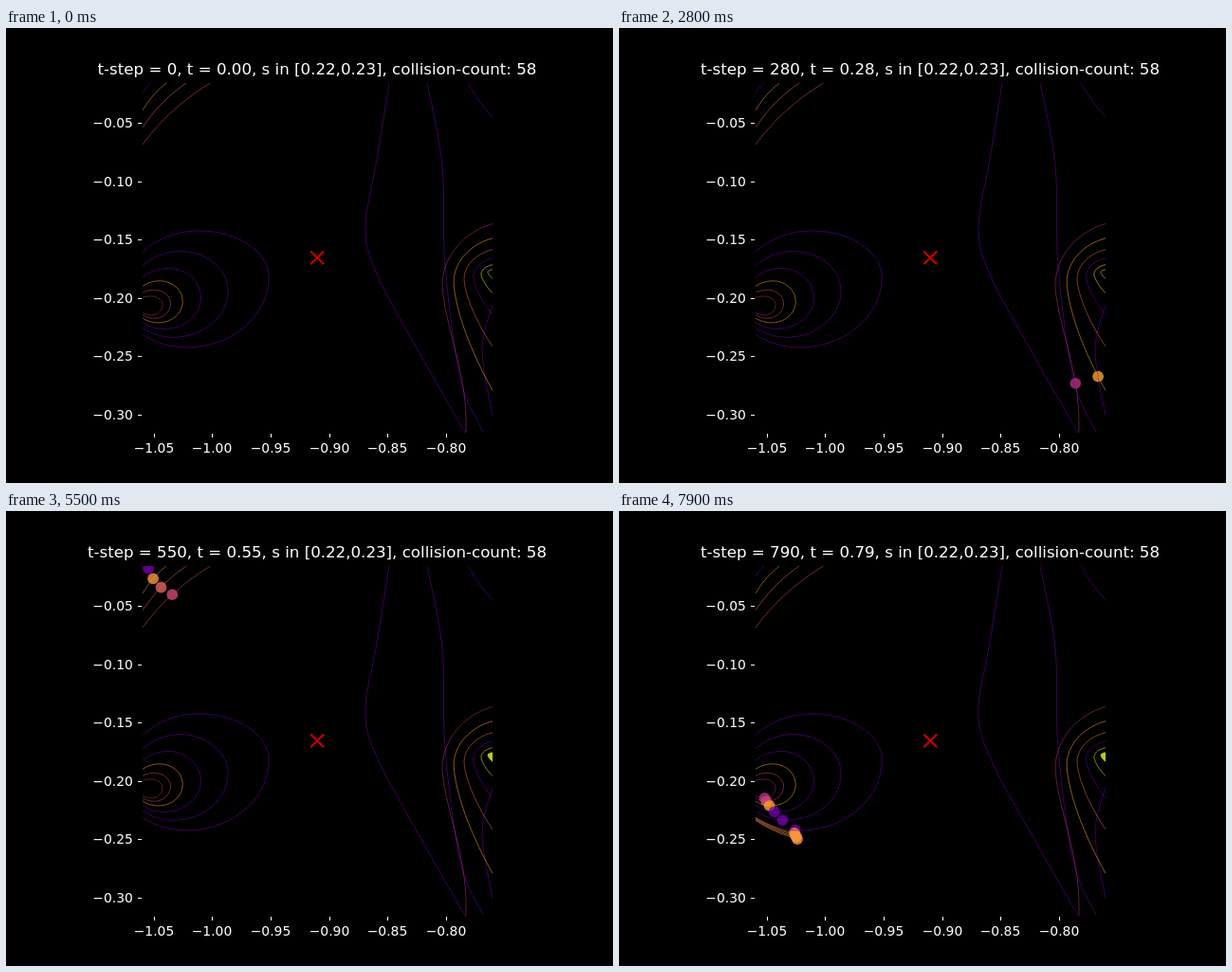
Animation, 640 px wide and 480 px high, one loop 8000 ms. Source, as an HTML page with a canvas:

```html
<!DOCTYPE html>
<html lang="en">
<head>
<meta charset="utf-8">
<title>Trajectories</title>
<style>
html, body { margin: 0; width: 100%; height: 100%; overflow: hidden; background: #000; }
canvas { display: block; width: 640px; height: 480px; }
</style>
</head>
<body>
<canvas id="stage" width="640" height="480"></canvas>
<script>
const ctx = document.getElementById('stage').getContext('2d');
const FONT = '"DejaVu Sans", sans-serif';
const PURPLE = '#7203a8', MAGENTA = '#b0307c', PINK = '#cc4778', SALMON = '#e16462',
      ORANGE = '#faa32c', AMBER = '#f89540', YELLOW = '#f0f921';
const LEFT = 144, TOP = 58, EDGE = 513, SIZE = 369;

// Points of f(u) for u from 0 to 1.
const sample = (f, n = 30) => Array.from({ length: n + 1 }, (_, i) => f(i / n));

// Quarter ellipse from p to q, leaving p vertically or horizontally.
function quarter(p, q, vertical) {
  return sample(u => {
    const s = Math.sin(u * Math.PI / 2), c = 1 - Math.cos(u * Math.PI / 2);
    return [p[0] + (q[0] - p[0]) * (vertical ? c : s), p[1] + (q[1] - p[1]) * (vertical ? s : c)];
  });
}

const bezier = (a, b, c) => sample(u =>
  [0, 1].map(k => (1 - u) ** 2 * a[k] + 2 * u * (1 - u) * b[k] + u * u * c[k]));

// Smooth curve through a few points.
function spline(p) {
  return p.slice(1).flatMap((c, i) => {
    const b = p[i], a = p[i - 1] || b, d = p[i + 2] || c;
    return sample(u => [0, 1].map(k => b[k] + 0.5 * u * (c[k] - a[k]
      + u * (2 * a[k] - 5 * b[k] + 4 * c[k] - d[k] + u * (3 * (b[k] - c[k]) + d[k] - a[k])))), 12);
  });
}

// Path of two parts; mark is the length where they join.
function path(color, before, after = []) {
  const pts = [...before, ...after].filter((p, i, all) =>
    !i || Math.hypot(p[0] - all[i - 1][0], p[1] - all[i - 1][1]) > 1e-6);
  const len = [0];
  for (let i = 1; i < pts.length; i++)
    len.push(len[i - 1] + Math.hypot(pts[i][0] - pts[i - 1][0], pts[i][1] - pts[i - 1][1]));
  const join = before[before.length - 1];
  const at = pts.findIndex(p => p[0] === join[0] && p[1] === join[1]);
  return { color, pts, len, mark: len[at < 0 ? len.length - 1 : at] };
}

// Point at length s, continued straight past both ends.
function pointAt({ pts, len }, s) {
  let i = 1;
  while (i < pts.length - 1 && len[i] < s) i++;
  const u = (s - len[i - 1]) / (len[i] - len[i - 1]);
  return [0, 1].map(k => pts[i - 1][k] + u * (pts[i][k] - pts[i - 1][k]));
}

const still = [
  [[404, 58], [391, 139], [379, 212], [393, 264], [440, 350], [484, 427]],
  [[444, 58], [460, 145], [463, 250], [479, 370], [503, 426]],
  [[487, 58], [499, 77], [513, 94]],
  [[513, 292], [502, 340], [513, 409]]
].map(p => path(PURPLE, spline(p)));

// Right edge: rising from below, turning at depth d, leaving to the upper right.
const right = [MAGENTA, ORANGE, SALMON, PURPLE, YELLOW, YELLOW].map((color, i) => {
  const d = 53 - 12.8 * i + 0.64 * i * i;
  const turn = [EDGE - d, 256 + 0.3 * d];
  const exit = 258 - 0.6 * d - 0.007 * d * d;
  const fall = i ? 1.2 * d + 0.039 * d * d : 155;
  const rise = sample(u => {
    const t = 1 - u;
    const x = i ? d * t ** 1.55 : 25 * Math.sin(1.68 * t) ** 1.5;
    return [turn[0] + x, turn[1] + fall * t];
  });
  const peak = [turn[0] + 1.45 * d, turn[1] - (turn[1] - exit) / 0.95];
  return path(color, rise, quarter(turn, peak, true));
});

// Upper left: from the top edge down to the left edge.
const upper = [PURPLE, AMBER, SALMON, PINK].map((color, j) => {
  const w = 9 + 14 * j + 2.3 * j * j, h = 11 + 18 * j;
  return path(color, bezier([LEFT + w, TOP], [LEFT + 0.4 * w, TOP + 0.4 * h], [LEFT, TOP + h]));
});

// Lower left: nested loops, each half as wide again, joined at the lowest point.
const lower = [MAGENTA, PINK, ORANGE, PURPLE, PURPLE, PURPLE].map((color, i) => {
  const w = 17 * 1.5 ** i;
  const west = [140 - 0.14 * w, 291 - 0.045 * w];
  const south = [148 + 0.33 * w, 296 + 0.42 * w - 0.0008 * w * w];
  const east = [148 + w, 294 - 0.1 * w - 0.0011 * w * w];
  const north = [145 + 0.45 * w, 297 - 0.85 * w + 0.0016 * w * w];
  return path(color, quarter(west, south, true),
    [...quarter(south, east, false), ...quarter(east, north, true), ...quarter(north, west, false)]);
});

// Outermost bundle, whose trail is drawn as it goes.
const bundle = [0, 1, 2, 3].map(i =>
  path(AMBER, bezier([LEFT, 323.5 + i], [163, 335 + i * 1.3], [185 + i, 340 + i * 2])));

const lines = [...still, ...right, ...upper, ...lower];

function stroke({ color, pts, len }, upTo = Infinity) {
  ctx.strokeStyle = color;
  ctx.beginPath();
  pts.forEach((p, i) => { if (len[i] <= upTo) ctx.lineTo(p[0], p[1]); });
  ctx.stroke();
}

function dot(p, s) {
  const [x, y] = pointAt(p, s);
  ctx.fillStyle = p.color;
  ctx.beginPath();
  ctx.arc(x, y, 5.9, 0, 2 * Math.PI);
  ctx.fill();
}

// Distance past the lowest point in the lower left loops.
function swing(n) {
  const u = n - 79;
  return 11 * u - 0.7 * u * u;
}

function dots(n) {
  const r = n - 36;
  if (n >= 27 && n < 46) {
    const s = -2.5 + 8.5 * r + 0.068 * r ** 3;
    [...right, right[5], right[5]].forEach(p => dot(p, p.mark + s));
  }
  if (n >= 50 && n < 64) upper.forEach((p, j) => dot(p, 15.5 * j - 22 + 26 * (n - 54)));
  if (n >= 73) {
    lower.forEach((p, i) => dot(p, p.mark + swing(n) - i));
    bundle.forEach(p => dot(p, p.mark + swing(n)));
  }
}

function text(str, x, y, size, align) {
  ctx.font = size + 'px ' + FONT;
  ctx.textAlign = align;
  ctx.fillText(str, x, y);
}

function axes(n) {
  ctx.fillStyle = '#fff';
  text(`t-step = ${n * 10}, t = ${(n / 100).toFixed(2)}, s in [0.22,0.23], collision-count: 58`,
    328, 49, 16.667, 'center');
  for (let i = 0; i < 6; i++) {
    const x = Math.round(155.7 + i * 61.6), y = Math.round(100 + i * 61.6);
    ctx.fillRect(139, y, 4, 1);
    ctx.fillRect(x, 428, 1, 4);
    text('\u2212' + (0.05 * (i + 1)).toFixed(2), 133.8, y + 5, 13.889, 'right');
    text('\u2212' + (1.05 - 0.05 * i).toFixed(2), x, 448, 13.889, 'center');
  }
}

function cross(x, y, r) {
  ctx.strokeStyle = '#f00';
  ctx.lineWidth = 2.08;
  ctx.beginPath();
  for (const k of [-r, r]) {
    ctx.moveTo(x - r, y - k);
    ctx.lineTo(x + r, y + k);
  }
  ctx.stroke();
}

function draw(n) {
  ctx.globalAlpha = 1;
  ctx.fillStyle = '#000';
  ctx.fillRect(0, 0, 640, 480);
  axes(n);

  ctx.save();
  ctx.beginPath();
  ctx.rect(LEFT, TOP, SIZE, SIZE);
  ctx.clip();
  ctx.globalAlpha = 0.8;
  dots(n);
  cross(328.2, 242.4, 6.94);

  ctx.lineWidth = 0.69;
  lines.forEach(p => stroke(p));
  if (n >= 73) bundle.forEach(p => stroke(p, p.mark + swing(n)));
  if (n >= 38) {
    ctx.fillStyle = YELLOW;
    ctx.beginPath();
    right[5].pts.forEach(p => ctx.lineTo(p[0], p[1]));
    ctx.fill();
  }
  ctx.restore();
}

function tick() {
  draw(Math.floor(performance.now() % 8000 / 100));
  requestAnimationFrame(tick);
}
tick();
</script>
</body>
</html>
```
